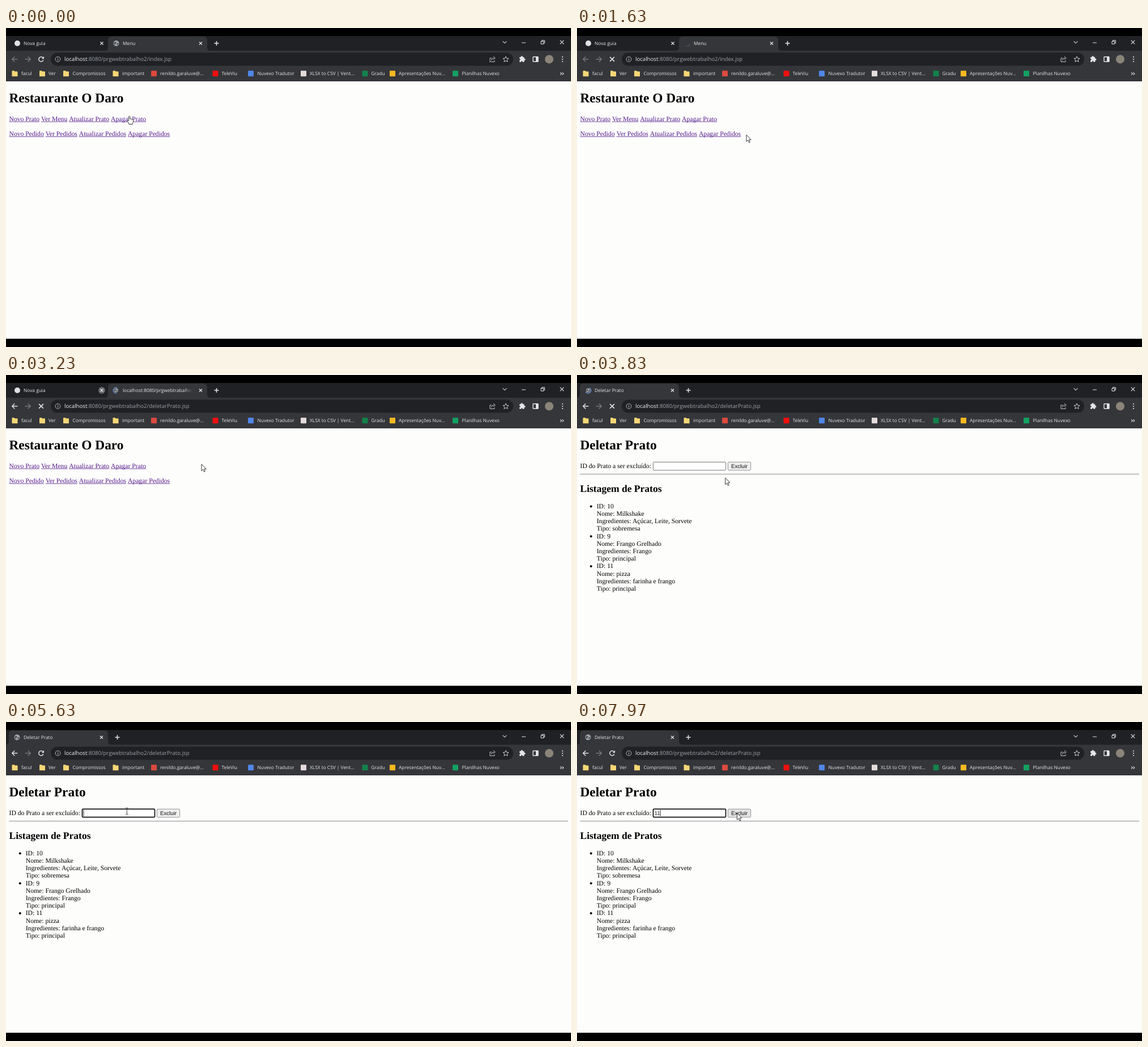
Animation, 997 px wide and 562 px high, one loop 8000 ms. Source, as an HTML page with a canvas:

```html
<!DOCTYPE html>
<html lang="pt">
<head>
<meta charset="utf-8">
<title>Deletar Prato</title>
<style>
html, body { margin: 0; width: 100%; height: 100%; overflow: hidden; background: #000; }
canvas { display: block; }
</style>
</head>
<body>
<canvas id="stage" width="997" height="562"></canvas>
<script>
const ctx = document.getElementById('stage').getContext('2d');
const LOOP = 8000;
const UI = '"Open Sans", "Noto Sans", sans-serif';
const SERIF = '"Liberation Serif", serif';
const SANS = '"Liberation Sans", sans-serif';
const SCALE = 0.73;
const DARK = '#202124', BAR = '#35363a', LIGHT = '#e4e6e9', DIM = '#9aa0a6', OFF = '#77797d';

// Moments of the story, in ms
const T = {
  statusOn: 180, click: 560, statusOff: 1200, commit: 2980, hoverTab: 2570, hoverEnd: 3340,
  closeTab: 3400, load: 3660, loaded: 3860, focus: 5400, popup: 5880, key1: 7540, key2: 7670
};

// Pointer hot spot: time, x, y
const PATH = [
  [0, 217.5, 155], [420, 217.5, 155], [830, 243, 160.5], [1100, 270, 168], [1700, 300, 189],
  [2000, 293, 160], [2430, 195.5, 37], [2650, 168.5, 26], [2980, 168.5, 26], [3230, 345, 157],
  [3330, 333, 214], [3600, 300, 200], [4100, 213.5, 157.5], [4670, 213.5, 157.5],
  [7030, 213, 156], [7680, 213, 157], [7940, 282.5, 160.5], [8000, 282.5, 160.5]
];

const clamp = v => Math.max(0, Math.min(1, v));
const ease = v => { v = clamp(v); return v * v * (3 - 2 * v); };
const ramp = (t, start, span) => clamp((t - start) / span);

function text(str, x, y, font, color, align = 'left') {
  ctx.font = font;
  ctx.fillStyle = color;
  ctx.textAlign = align;
  ctx.fillText(str, x, y);
  return ctx.measureText(str).width;
}

const ui = (str, x, y, size = 8.35, color = LIGHT) => text(str, x, y, `${size}px ${UI}`, color);
const serif = (str, x, y, px = 16, weight = '') =>
  text(str, x, y, `${weight} ${px * SCALE}px ${SERIF}`, '#000');

function rect(x, y, w, h, color) {
  ctx.fillStyle = color;
  ctx.fillRect(x, y, w, h);
}

function round(x, y, w, h, r, fill, stroke, width = 1) {
  ctx.beginPath();
  ctx.roundRect(x, y, w, h, r);
  if (fill) { ctx.fillStyle = fill; ctx.fill(); }
  if (stroke) { ctx.strokeStyle = stroke; ctx.lineWidth = width; ctx.stroke(); }
}

function disc(x, y, r, color) {
  ctx.beginPath();
  ctx.arc(x, y, r, 0, 7);
  ctx.fillStyle = color;
  ctx.fill();
}

function arc(x, y, r, from, to, color, width = 1.2) {
  ctx.beginPath();
  ctx.arc(x, y, r, from, to);
  ctx.strokeStyle = color;
  ctx.lineWidth = width;
  ctx.stroke();
}

function path(d, x, y, stroke, width = 1.2, fill) {
  const p = new Path2D(d);
  ctx.save();
  ctx.translate(x, y);
  if (fill) { ctx.fillStyle = fill; ctx.fill(p); }
  if (stroke) { ctx.strokeStyle = stroke; ctx.lineWidth = width; ctx.stroke(p); }
  ctx.restore();
}

const cross = (x, y, r, color, width) =>
  path(`M${-r} ${-r}L${r} ${r}M${r} ${-r}L${-r} ${r}`, x, y, color, width);

function globe(x, y, r) {
  disc(x, y, r, '#a4a8ac');
  path('M-.7-.4Q-.1-.9 .1-.3T-.3.3ZM.2 0L.8-.2Q.9.4.3.7Z', x, y, null, 0, null);
  ctx.save();
  ctx.translate(x, y);
  ctx.scale(r, r);
  ctx.fillStyle = '#4c5054';
  ctx.fill(new Path2D('M-.85-.2Q-.2-.8 0-.3Q.1.1-.3.2Q-.3.5-.45.6Q-.9.2-.85-.2ZM.15.1Q.5-.2.85 0Q.75.6.25.75Z'));
  ctx.restore();
}

function tabShape(x, w, color) {
  path(`M-6 25Q0 25 0 19V7Q0 0 7 0H${w - 7}Q${w} 0 ${w} 7V19Q${w} 25 ${w + 6} 25Z`, x, 15, null, 0, color);
}

function drawTabs(t) {
  rect(0, 14, 997, 27, DARK);
  const shut = ease(ramp(t, T.closeTab, 200));
  const x = 5 + 175 * (1 - shut);

  if (shut < 1) {
    ctx.save();
    ctx.beginPath();
    ctx.rect(0, 14, x + 1, 27);
    ctx.clip();
    const glow = ramp(t, T.hoverTab, 120) * (1 - ramp(t, 3080, 140));
    if (glow) {
      ctx.globalAlpha = glow;
      tabShape(5, x - 5, '#2b2c30');
      ctx.globalAlpha = 1;
    }
    disc(20, 27, 5, '#dfe1e4');
    ui('Nova guia', 31, 30);
    if (t > T.hoverTab + 60 && t < T.hoverEnd) disc(x - 11, 27, 6, '#66696d');
    cross(x - 11, 27, 2.5, LIGHT);
    ctx.restore();
  }

  tabShape(x, 175, BAR);
  drawTabIcon(t, x + 14.5, 27);
  const title = t < T.commit ? 'Menu' : t < T.load ? 'localhost:8080/prgwebtrabalho2/deletarPrato.jsp' : 'Deletar Prato';
  ctx.save();
  ctx.beginPath();
  ctx.rect(x, 15, 150, 25);
  ctx.clip();
  const fade = ctx.createLinearGradient(x + 134, 0, x + 150, 0);
  fade.addColorStop(0, LIGHT);
  fade.addColorStop(1, BAR);
  ui(title, x + 26, 30, 8.35, fade);
  ctx.restore();
  cross(x + 163.5, 27, 2.5, LIGHT);
  path('M-4 0H4M0-4V4', x + 191.5, 27, LIGHT, 1.5);

  path('M-3.5-1.7L0 1.7L3.5-1.7', 880, 25, '#c4c7ca', 1.1);
  rect(910, 25.5, 7, 1, LIGHT);
  path('M-3-1.5H1.7V3.2H-3ZM-1.5-1.5V-3.2H3.4V1.6H1.7', 947, 25, LIGHT, 1);
  cross(981, 25, 3.3, LIGHT, 1.1);
}

function drawTabIcon(t, x, y) {
  if (t < T.click || t > T.loaded) {
    globe(x, y, 5);
  } else if (t < T.commit) {
    const a = Math.PI * 1.1 - (t - 830) / 1600 * Math.PI * 2;
    arc(x, y, 5, a, a + 1.5, '#4c5a7c', 1.3);
  } else {
    globe(x, y, 3.6);
    const a = t / 1000 * Math.PI * 2;
    arc(x, y, 5.2, a, a + 3.6, '#6d94d8', 1.3);
  }
}

function drawToolbar(t) {
  rect(0, 40, 997, 54, BAR);
  const arrow = 'M4.8 0H-4.5M-.2-4.5L-4.7 0L-.2 4.5';
  path(arrow, 15.5, 55, t < T.commit ? OFF : LIGHT, 1.4);
  path('M-4.8 0H4.5M.2-4.5L4.7 0L.2 4.5', 38.5, 55, OFF, 1.4);
  if (t >= T.click && t < T.loaded) {
    cross(62, 55, 3.9, LIGHT, 1.5);
  } else {
    arc(62, 55, 4.2, 0.4, 5.5, LIGHT, 1.5);
    path('M5-5V-.7H.7Z', 62, 55, null, 0, LIGHT);
  }

  round(79, 43.5, 816, 23, 11.5, DARK);
  arc(91.5, 55, 4.4, 0, 7, '#b4b8bc', 1);
  rect(91, 54.3, 1.1, 3.1, '#b4b8bc');
  rect(91, 52.4, 1.1, 1.1, '#b4b8bc');
  const w = ui('localhost', 103, 58.4, 9.63, '#f0f1f3');
  const file = t < T.commit ? 'index' : 'deletarPrato';
  ui(`:8080/prgwebtrabalho2/${file}.jsp`, 103 + w, 58.4, 9.63, DIM);

  path('M-1.5-2H-4.5V4.5H3.5V2M-2 2Q-1.5-2 2.5-2M1.5-4.8L4.8-2L1.5.8', 858.5, 55, '#c2c5c9', 1);
  path('M0-5L1.4-1.6L5-1.3L2.3 1.1L3.1 4.6L0 2.7L-3.1 4.6L-2.3 1.1L-5-1.3L-1.4-1.6Z', 882, 55, '#c9ccd0', 1);

  round(906, 51.3, 8.4, 8.6, 1.2, LIGHT);
  disc(910.2, 51, 1.7, LIGHT);
  disc(914.8, 55.6, 1.7, LIGHT);
  disc(906.2, 55.6, 1.4, BAR);
  disc(910.2, 59.7, 1.4, BAR);
  round(930, 50.8, 9, 8.4, 0.8, null, LIGHT, 1.4);
  rect(935, 51, 4, 8, LIGHT);
  disc(958.5, 55, 7.6, '#8b8479');
  for (const dy of [-4, 0, 4]) disc(982, 55 + dy, 1.1, LIGHT);
}

const FOLDERS = [[10.5, 'facul', 27], [59, 'Ver', 75], [101, 'Compromissos', 117.5], [188.5, 'important', 205]];
const MARKS = [
  [261, '#dc4a3e', 'renildo.garaluve@...', 272],
  [369.5, '#f00f0f', 'TeleViu', 380.5],
  [432, '#4f86e8', 'Nuvexo Tradutor', 443.5],
  [525, '#e4dcdc', 'XLSX to CSV | Vent...', 536],
  [633.5, '#14814a', 'Gradu', 644.5],
  [682, '#f4b921', 'Apresentações Nuv...', 693],
  [793, '#12a160', 'Planilhas Nuvexo', 804.5]
];

function drawBookmarks() {
  for (const [x, label, tx] of FOLDERS) {
    path('M0 1Q0 0 1 0H4L5 1.2H9Q10 1.2 10 2.2V10H0Z', x, 75.3, null, 0, '#f6d776');
    ui(label, tx, 83.3);
  }
  for (const [x, color, label, tx] of MARKS) {
    round(x - 5, 75.3, 10, 10, 1, color);
    ui(label, tx, 83.3);
  }
  path('M-2.8-2.2L-.6 0L-2.8 2.2M.6-2.2L2.8 0L.6 2.2', 981, 80.5, LIGHT, 1.1);
}

const LINKS = [
  [163.6, ['Novo Prato', 'Ver Menu', 'Atualizar Prato', 'Apagar Prato']],
  [189.8, ['Novo Pedido', 'Ver Pedidos', 'Atualizar Pedidos', 'Apagar Pedidos']]
];

// Draws the first page; tells whether the pointer is on a link
function drawMenu(px, py) {
  serif('Restaurante O Daro', 5.5, 131.3, 32, 'bold');
  const font = `${16 * SCALE}px ${SERIF}`;
  let over = false;
  for (const [y, words] of LINKS) {
    let x = 5.5;
    for (const word of words) {
      const w = text(word, x, y, font, '#551a8b');
      rect(x, y + 1.1, w, 0.8, '#551a8b');
      over ||= px >= x && px <= x + w && py >= y - 11 && py <= y + 3;
      x += w + 4 * SCALE;
    }
  }
  return over;
}

const DISHES = [
  [10, 'Milkshake', 'Açúcar, Leite, Sorvete', 'sobremesa'],
  [9, 'Frango Grelhado', 'Frango', 'principal'],
  [11, 'pizza', 'farinha e frango', 'principal']
];

function drawDelete(t, px, py) {
  serif('Deletar Prato', 5.5, 131.3, 32, 'bold');
  serif('ID do Prato a ser excluído:', 5.5, 164);
  const focused = t >= T.focus;
  if (focused) round(134.5, 153.3, 128, 14.4, 1.5, '#fff', '#101010', 1.7);
  else round(134.4, 153.4, 128.2, 14.4, 1.3, '#fff', '#767676', 1);

  const typed = t < T.key1 ? '' : t < T.key2 ? '1' : '11';
  const field = `${13.333 * SCALE}px ${SANS}`;
  const w = text(typed, 136.6, 163.8, field, '#222');
  const since = t - (t >= T.key2 ? T.key2 : t >= T.key1 ? T.key1 : T.focus);
  if (focused && since % 1000 < 500) rect(136.6 + w, 155, 0.8, 11, '#000');

  const onButton = px > 266 && px < 307 && py > 153 && py < 168;
  round(266.4, 153.4, 40.2, 14.4, 1.6, onButton ? '#e3e3e3' : '#efefef', '#8a8a8a', 0.9);
  text('Excluir', 286.5, 163.8, field, '#111', 'center');
  rect(5.5, 174, 986.5, 1.2, '#9c9c9c');

  serif('Listagem de Pratos', 5.5, 205.8, 24, 'bold');
  DISHES.forEach(([id, name, parts, kind], i) => {
    const y = 234.8 + i * 52.8;
    disc(24.8, y - 3.4, 2, '#000');
    [`ID: ${id}`, `Nome: ${name}`, `Ingredientes: ${parts}`, `Tipo: ${kind}`]
      .forEach((line, n) => serif(line, 34.7, y + n * 13.2));
  });

  if (t >= T.popup && t < T.key1) {
    round(183, 175, 114, 32.3, 2, '#26282c');
    path('M0 0L7 6.5H-7Z', 198, 169, null, 0, '#26282c');
    ui('8', 191.5, 194.4, 9);
  }
  return px > 134 && px < 263 && py > 152 && py < 169;
}

function drawStatus(t) {
  const alpha = ramp(t, T.statusOn, 150) * (1 - ramp(t, T.statusOff, 200));
  if (!alpha) return;
  ctx.globalAlpha = alpha;
  round(0, 532, 197, 15.5, [0, 2, 0, 0], DARK);
  ui('localhost:8080/prgwebtrabalho2/deletarPrato.jsp', 3, 543, 8.25);
  ctx.globalAlpha = 1;
}

const POINTERS = {
  arrow: (x, y) => path('M0 0V11.8L2.7 9.3L4.6 13.6L6.5 12.8L4.6 8.6H8.3Z', x, y, '#222', 0.9, '#fff'),
  hand: (x, y) => path('M-1.2 1Q0-1 1.2 1V5.2Q2.6 4.2 3.2 5.7Q4.8 4.9 5.3 6.4Q7.2 5.8 7.3 7.8Q7.4 11 5.8 12.2V14.5H-.6V13Q-2.8 10.6-3.6 8.4Q-3.2 6.8-1.2 8.6Z', x, y, '#222', 0.9, '#fff'),
  beam: (x, y) => path('M-2.3-5.7H-.6L0-5.2L.6-5.7H2.3M0-5.2V5.2M-2.3 5.7H-.6L0 5.2L.6 5.7H2.3', x, y, '#333', 0.9)
};

function pointerAt(t) {
  const i = PATH.findIndex(p => p[0] > t);
  const [t0, x0, y0] = PATH[i - 1], [t1, x1, y1] = PATH[i];
  const k = ease((t - t0) / (t1 - t0));
  return [x0 + (x1 - x0) * k, y0 + (y1 - y0) * k];
}

function draw(t) {
  const [px, py] = pointerAt(t);
  rect(0, 0, 997, 562, '#000');
  rect(0, 94, 997, 453.5, '#fdfdfc');
  drawTabs(t);
  drawToolbar(t);
  drawBookmarks();
  let kind = 'arrow';
  if (t < T.load) {
    if (drawMenu(px, py)) kind = 'hand';
  } else if (drawDelete(t, px, py)) {
    kind = 'beam';
  }
  drawStatus(t);
  POINTERS[kind](px, py);
}

ctx.textRendering = 'geometricPrecision';
const start = performance.now();
function tick() {
  draw((performance.now() - start) % LOOP);
  requestAnimationFrame(tick);
}
tick();
</script>
</body>
</html>
```
